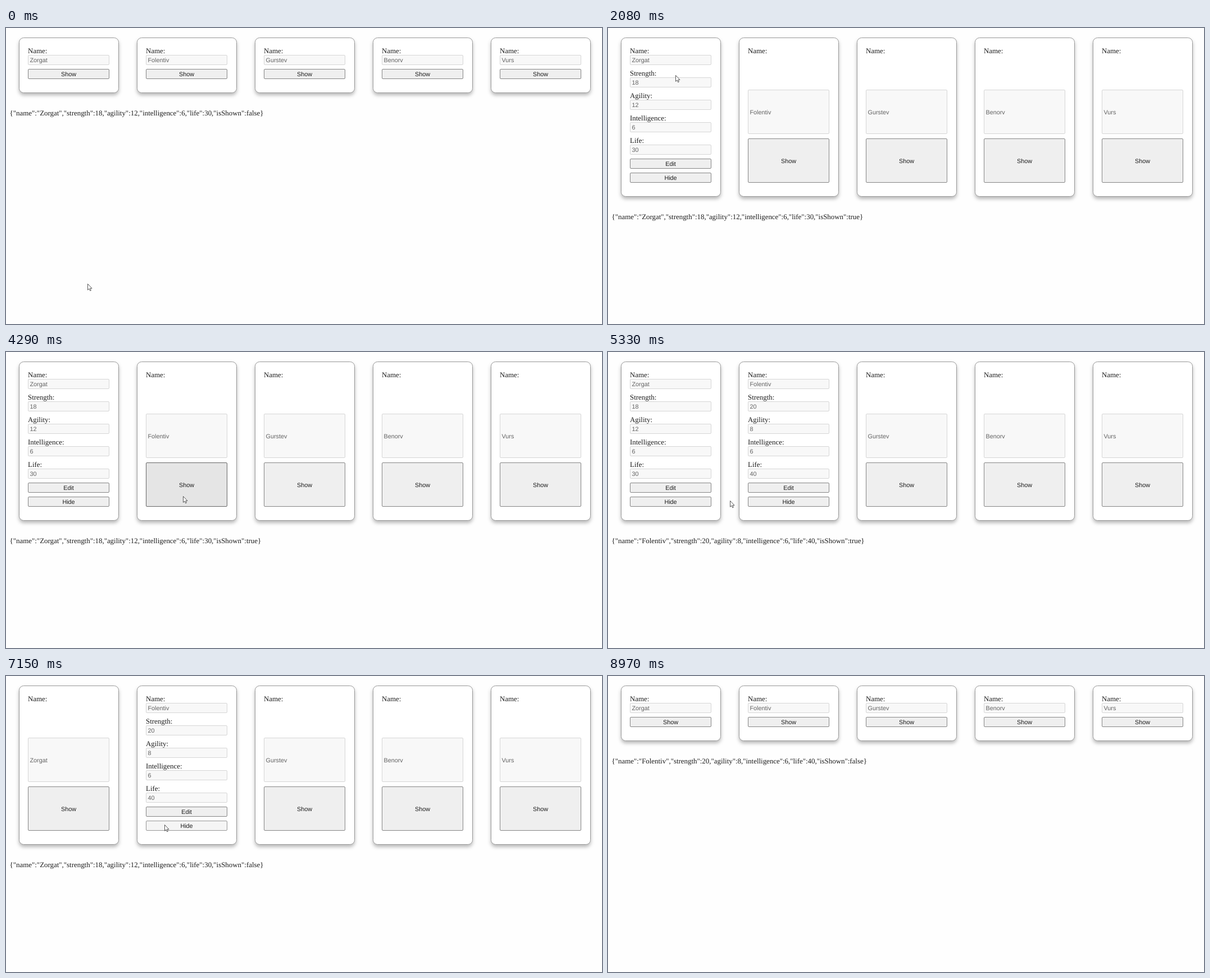
An HTML page that plays this animation: 1061 px wide and 528 px high, repeating every 9100 ms.

```html
<!DOCTYPE html>
<html lang="en">
<head>
<meta charset="utf-8">
<title>Hero cards</title>
<style>
  html, body { margin: 0; width: 100%; height: 100%; overflow: hidden; background: #fefefe; }
  svg { display: block; width: 1061px; height: 528px; }
  text { font: 12.92px "Liberation Serif", "Times New Roman", serif; fill: #1c1c1c; text-rendering: geometricPrecision; white-space: pre; }
  .field text, .button text { font: 10.8px "Liberation Sans", Arial, sans-serif; }
  .card { fill: #fff; stroke: #999; filter: drop-shadow(0 4px 3px rgba(0, 0, 0, .27)); }
  .field rect { fill: #f8f8f8; stroke: #d6d6d6; }
  .field text { fill: #626262; }
  .button rect { fill: #efefef; stroke: #858585; }
  .button text { text-anchor: middle; }
  .hover rect { fill: #e5e5e5; stroke: #666; }
  .down rect { fill: #f5f5f5; stroke: #969696; }
  #cursor { fill: #fff; stroke: #444; stroke-width: .9; stroke-linejoin: round; }
</style>
</head>
<body>
<svg viewBox="0 0 1061 528">
  <g id="page"></g>
  <path id="cursor" d="M.5 .5V11.3L3 9L4.7 12.8L6.4 12L4.8 8.4H8Z"/>
</svg>
<script>
const LOOP = 9100, STEP = 130, PITCH = 210;
const heroes = [
  { name: "Zorgat", strength: 18, agility: 12, intelligence: 6, life: 30 },
  { name: "Folentiv", strength: 20, agility: 8, intelligence: 6, life: 40 },
  { name: "Gurstev" }, { name: "Benorv" }, { name: "Vurs" }
];
const clicks = [
  { press: 1820, release: 2080, card: 0, show: true },
  { press: 4420, release: 4680, card: 1, show: true },
  { press: 5850, release: 5980, card: 0, show: false },
  { press: 7150, release: 7410, card: 1, show: false }
];
// time, x, y
const path = [
  [0, 145, 456], [1040, 127, 108], [1430, 120, 84], [2210, 120, 84],
  [3120, 315, 257], [4810, 315, 257], [5720, 154, 270], [6370, 154, 270],
  [7150, 282, 265], [7540, 282, 265], [8450, 300, 540], [LOOP, 300, 540]
];
const page = document.getElementById("page");
const cursor = document.getElementById("cursor");

function cursorAt(t) {
  const i = path.findIndex(p => p[0] > t);
  const [t0, x0, y0] = path[i - 1], [t1, x1, y1] = path[i];
  const u = (t - t0) / (t1 - t0), e = u * u * (3 - 2 * u);
  return { x: Math.round(x0 + (x1 - x0) * e), y: Math.round(y0 + (y1 - y0) * e) };
}

const text = (x, y, s) => `<text x="${x}" y="${y}">${s}</text>`;
const box = (x, y, h) => `<rect x="${x}" y="${y}" width="144" height="${h}" rx="1.5"/>`;
const field = (x, y, h, s) =>
  `<g class="field">${box(x, y, h)}${text(x + 3, y + h / 2 + 4, s)}</g>`;

function button(x, y, h, label, pos, pressed) {
  const hit = pos.x >= x && pos.x <= x + 144 && pos.y >= y && pos.y <= y + h;
  const mood = hit ? (pressed ? "down" : "hover") : "";
  return `<g class="button ${mood}">${box(x, y, h)}${text(x + 72, y + h / 2 + 4, label)}</g>`;
}

function card(hero, i, open, tall, pos, pressed) {
  const left = 23.5 + i * PITCH, x = left + 16;
  let out = `<rect class="card" x="${left}" y="17.5" width="177" height="${tall ? 283 : 98}" rx="8"/>`;
  if (open) {
    Object.entries(hero).forEach(([key, value], row) => {
      const y = 45 + row * 40;
      out += text(x - .5, y, key[0].toUpperCase() + key.slice(1) + ":") + field(x, y + 3.5, 17, value);
    });
    return out + button(x, 233.5, 17, "Edit", pos, pressed) + button(x, 258.5, 17, "Hide", pos, pressed);
  }
  out += text(x - .5, 45, "Name:");
  return out + (tall
    ? field(x, 110.5, 78, hero.name) + button(x, 197.5, 78, "Show", pos, pressed)
    : field(x, 48.5, 17, hero.name) + button(x, 73.5, 17, "Show", pos, pressed));
}

function render(t) {
  const pos = cursorAt(t), open = heroes.map(() => false);
  let last = { card: 0, show: false };
  for (const c of clicks) {
    if (c.release <= t) {
      open[c.card] = c.show;
      last = c;
    }
  }
  const tall = open.includes(true);
  const pressed = clicks.some(c => c.press <= t && t < c.release);
  const log = JSON.stringify({ ...heroes[last.card], isShown: last.show });
  page.innerHTML = heroes.map((h, i) => card(h, i, open[i], tall, pos, pressed)).join("")
    + text(6.6, tall ? 341 : 156, log);
  cursor.setAttribute("transform", `translate(${pos.x} ${pos.y})`);
}

let shown = -1;
function tick() {
  const t = Math.floor(performance.now() % LOOP / STEP) * STEP;
  if (t !== shown) render(shown = t);
  requestAnimationFrame(tick);
}
tick();
</script>
</body>
</html>
```
